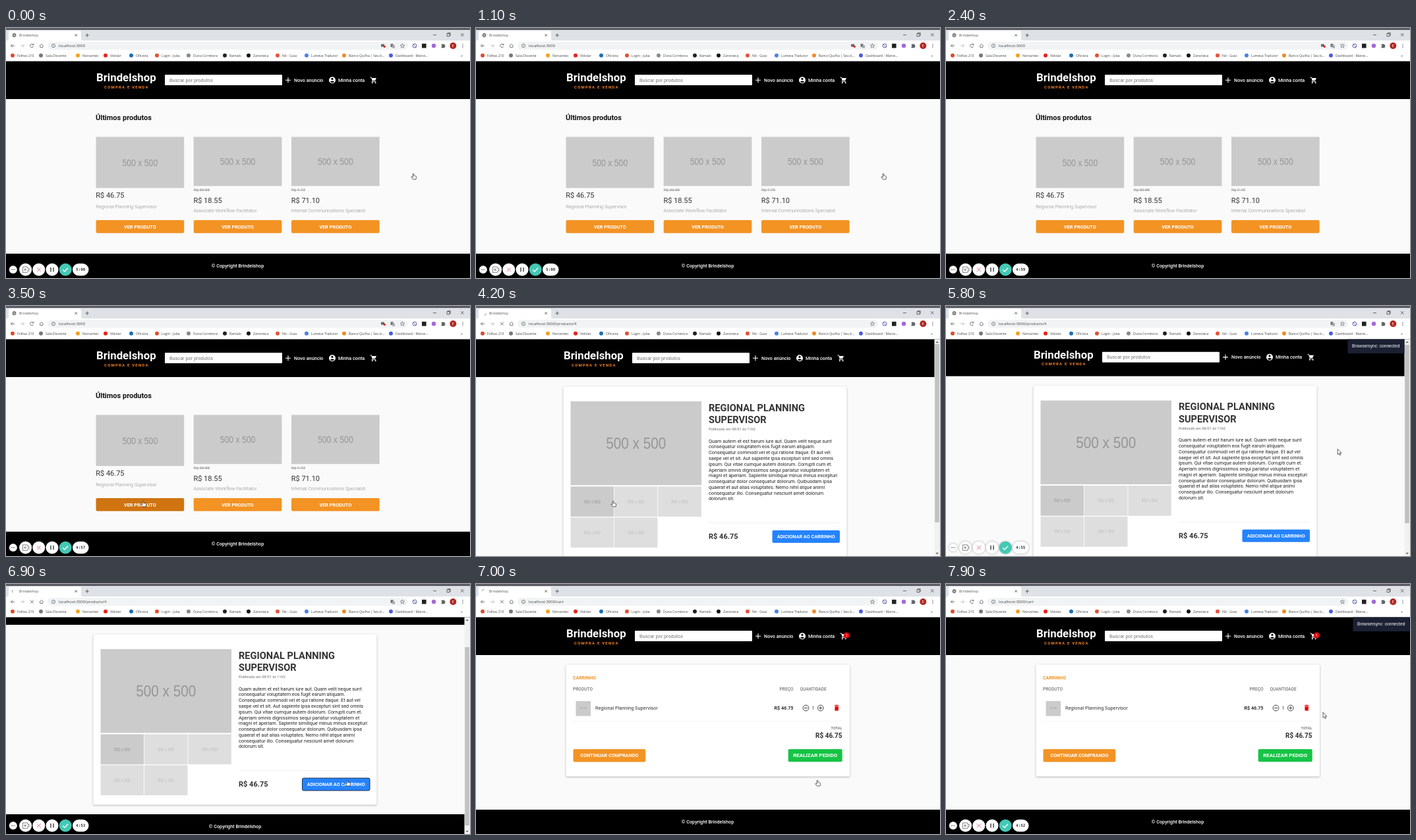
An HTML page that plays this animation: 704x380 px, repeating every 8 s.

```html
<!DOCTYPE html>
<html lang="pt-BR">
<head>
<meta charset="utf-8">
<title>Brindelshop</title>
<style>
html, body { margin: 0; width: 100%; height: 100%; overflow: hidden; background: #fafafa }
svg { display: block; width: 704px; height: 380px; font-family: Roboto, sans-serif }
text { white-space: pre }
.ui { font-family: "Open Sans", sans-serif }
.arial { font-family: "Liberation Sans", sans-serif }
.mono { font-family: "DejaVu Sans Mono", monospace }
.card { filter: drop-shadow(0 1px 1.5px rgba(0,0,0,.28)) }
.tool { filter: drop-shadow(0 .5px 1.5px rgba(0,0,0,.35)) }
</style>
</head>
<body>
<svg id="stage" viewBox="0 0 704 380"></svg>
<script>
const LOOP = 8000;
const SHOP = 'Brindelshop', ITEM = 'Regional Planning Supervisor';
const ORANGE = '#f39324';
const BOOKMARKS = [
  [10, '#e0492c', 'Folhas 210'], [53, '#777', 'Sala Discente'], [109, '#f2a01f', 'Norvantec'],
  [151, '#e8231c', 'Vidolar'], [190, '#1b6fb5', 'Oficiora'], [229, '#e2502c', 'Login - Juba'],
  [277, '#8a8a8a', 'Duna Corretora'], [332, '#222', 'Ramalo'], [368, '#111', 'Zarvoteca'],
  [412, '#e5533a', 'Nó - Guia'], [456, '#4a80e8', 'Lumeva Tradutor'],
  [513, '#f08a24', 'Banco Quilha | Seu b...'], [584, '#4a5be0', 'Dashboard - Marce...']
];
const LOREM = [
  'Quam autem et est harum iure aut. Quam velit neque sunt',
  'consequatur voluptatem eos fugit earum aliquam.',
  'Consequatur commodi vel et qui ratione itaque. Et aut vel',
  'saepe vel et sit. Aut sapiente ipsa excepturi sint sed omnis',
  'ipsum. Qui vitae cumque autem dolorum. Corrupti cum et.',
  'Aperiam omnis dignissimos sequi pariatur voluptatem et',
  'magni et aperiam. Sapiente similique minus minus excepturi',
  'consequatur dolor consequatur dolorum. Quibusdam ipsa',
  'quaerat et aut alias voluptates. Nemo nihil atque animi',
  'consequatur illo. Consequatur nesciunt amet dolorum',
  'dolorum sit.'
];
// Pointer tip: time, x, y
const PATH = [[0, 618, 221], [2800, 618, 221], [3400, 208, 296], [4550, 208, 296], [5250, 602, 209],
  [5650, 602, 209], [6450, 518, 298], [7250, 518, 298], [7750, 572, 195], [LOOP, 572, 195]];

const text = (x, y, s, size, fill, attrs = '') =>
  `<text x="${x}" y="${y}" font-size="${size}" fill="${fill}" ${attrs}>${s}</text>`;
const rect = (x, y, w, h, fill, attrs = '') =>
  `<rect x="${x}" y="${y}" width="${w}" height="${h}" fill="${fill}" ${attrs}/>`;
const circle = (x, y, r, fill, attrs = '') => `<circle cx="${x}" cy="${y}" r="${r}" fill="${fill}" ${attrs}/>`;
const line = (d, color, w = 1, attrs = '') =>
  `<path d="${d}" fill="none" stroke="${color}" stroke-width="${w}" ${attrs}/>`;
const shape = (d, fill, attrs = '') => `<path d="${d}" fill="${fill}" ${attrs}/>`;
const move = (x, y, s) => `<g transform="translate(${x} ${y})">${s}</g>`;
const BOLD = 'font-weight="700"', MEDIUM = 'font-weight="500"', LIGHT = 'font-weight="300"';
const MID = 'text-anchor="middle"', END = 'text-anchor="end"', UI = 'class="ui"';

const between = (t, a, b) => t >= a && t < b;
const ease = (t, a, b) => {
  const k = Math.min(1, Math.max(0, (t - a) / (b - a)));
  return k * k * (3 - 2 * k);
};

function pointer(t) {
  const i = Math.max(1, PATH.findIndex(p => p[0] > t));
  const [a, b] = [PATH[i - 1], PATH[i]], k = ease(t, a[0], b[0]);
  return [a[1] + (b[1] - a[1]) * k, a[2] + (b[2] - a[2]) * k];
}

const globe = (x, y) => circle(x, y, 2.9, '#666') +
  line(`M${x - 2} ${y - 1}l2 1 1-1.6M${x - 1} ${y + 2}l1-1.2 2 .2`, '#fff', .8);

const button = (x, y, w, h, fill, label, size = 7.3, attrs = '') =>
  rect(x, y, w, h, fill, `rx="2" ${attrs}`) +
  text(x + w / 2, y + h / 2 + size * .36, label, size, '#fff', `${BOLD} ${MID}`);

const placeholder = (x, y, w, h, size, opacity = 1) =>
  `<g opacity="${opacity}">` + rect(x, y, w, h, '#cbcbcb') +
  `<g transform="translate(${x + w / 2} ${y + h / 2}) scale(.85 1)">` +
  text(0, size * .36, '500 x 500', size, '#969696', `class="arial" ${MID}`) + '</g></g>';

function browser(t, url, loading, home) {
  const grey = '#5f6368';
  let s = rect(0, 0, 704, 50.5, '#fff') + rect(0, 0, 704, 19, '#dee1e6') + rect(0, 0, 704, 3, '#5c5c64') +
    shape('M2 19q2 0 2-3V7q0-3 3-3H111q3 0 3 3v9q0 3 2 3z', '#fff') +
    text(20, 12.8, SHOP, 5.1, '#555', UI) +
    line('M104.5 9.3l3.4 3.4m0-3.4l-3.4 3.4M120.5 11h5.4m-2.7-2.7v5.4', '#444', .8) +
    line('M648 10.5h5M669 8.6h4v4h-4zM670.2 8.4v-1h4v4h-1M690 8l4.6 4.6m0-4.6l-4.6 4.6', '#333', .7);
  s += loading
    ? line('M12.5 8a3 3 0 0 1 3 3', '#8a8f96', .9, `transform="rotate(${t * .45 % 360} 12.5 11)"`)
    : globe(12.5, 11);
  s += line('M13 27H7.5m2.5-2.5L7.5 27l2.5 2.5', grey, .9) +
    line('M22 27h5.5m-2.5-2.5l2.5 2.5-2.5 2.5', '#b9bbbf', .9) +
    (loading ? line('M37 24.6l4.8 4.8m0-4.8L37 29.4', grey, .9)
      : line('M41.6 28a2.6 2.6 0 1 1-.3-2.6M41.8 23.8v2h-2', grey, .9)) +
    line('M50.8 27l3-2.7 3 2.7M51.8 26.6v3h4v-3', grey, .8) +
    rect(63, 21, 547, 12, '#f1f3f4', 'rx="6"') +
    circle(72, 27, 2.7, 'none', `stroke="${grey}" stroke-width=".7"`) + line('M72 26.5v2M72 25.2v.7', grey, .7) +
    text(80, 29.2, 'localhost:3000' + url, 5.95, '#444', UI);
  if (home) s += rect(569, 24.5, 5, 4, '#666', 'rx=".5"') + circle(574.3, 28.3, 1.7, '#d93025');
  if (home || (between(t, 4600, 7000)))
    s += rect(583.5, 24, 4, 5, '#777', 'rx=".5"') + rect(586, 26, 4, 4.4, '#a5a9ae', 'rx=".5"');
  s += line('M601.5 23.8l.9 2.2 2.3.1-1.8 1.5.6 2.3-2-1.3-2 1.3.6-2.3-1.8-1.5 2.3-.1z', grey, .7) +
    circle(620, 27, 3, 'none', 'stroke="#5862a8" stroke-width="1"') + line('M618 25l4 4', '#5862a8', .8) +
    rect(631, 23.8, 6.6, 6.6, '#222') + circle(649, 27, 3.2, '#a568d8') +
    shape('M660.5 25h1.6a1 1 0 1 1 2 0h1.6v1.6a1 1 0 1 1 0 2v1.7h-5.2v-1.7a1 1 0 1 0 0-2z', grey) +
    circle(678.3, 27, 5, '#b3261e') + text(678.3, 29, 'E', 5.2, '#fff', MID) +
    [24.7, 27, 29.3].map(y => circle(693, y, .7, grey)).join('');
  for (const [x, color, label] of BOOKMARKS)
    s += circle(x, 41.7, 3, color) + text(x + 7, 43.7, label, 5.1, '#444', UI);
  return s + text(690, 43.7, '»', 6, '#444', UI);
}

function header(badge) {
  return rect(-10, 50, 724, 58, '#000') +
    text(182.3, 81.2, SHOP, 16.8, '#fff', `${BOLD} ${MID}`) +
    text(149, 91.8, 'COMPRA E VENDA', 6, '#f5832a', `${BOLD} letter-spacing="1.2"`) +
    rect(241, 71, 178, 16, '#fff', 'rx="1"') +
    text(248, 81.7, 'Buscar por produtos', 7.3, '#757575') +
    line('M424 79.2h8m-4-4v8', '#fff', 1.1) +
    text(437, 81.8, 'Novo anúncio', 7.25, '#fff', MEDIUM) +
    circle(495, 79.2, 5, '#fff') + circle(495, 77.3, 1.6, '#000') + shape('M491.8 81.6q3.2-2.4 6.4 0-3.2 3.4-6.4 0z', '#000') +
    text(504, 81.8, 'Minha conta', 7.25, '#fff', MEDIUM) +
    line('M552.5 75h1.8l2 4.6h4', '#fff', 1) + shape('M555 76h7l-2 4h-4z', '#fff') +
    line('M556.2 79.6l-1 1.9h6', '#fff', .9) + circle(555.8, 83.2, 1, '#fff') + circle(560.6, 83.2, 1, '#fff') +
    (badge ? circle(562.3, 78, 4.6, '#e30613') + text(562.3, 80, '1', 5.5, '#fff', MID) : '');
}

const footer = y => rect(-10, y, 724, 60, '#000') +
  text(351.5, y + 21.3, `© Copyright ${SHOP}`, 7.25, '#fff', `${MEDIUM} ${MID}`);

function homePage(hover) {
  const cards = [
    [136.5, 'R$ 46.75', ITEM],
    [284.7, 'R$ 18.55', 'Associate Workflow Facilitator', 'R$ 30.88'],
    [433, 'R$ 71.10', 'Internal Communications Specialist', 'R$ 7.73']
  ];
  let s = header() + text(136, 140.3, 'Últimos produtos', 11, '#111', BOLD);
  cards.forEach(([x, price, name, old], i) => {
    s += placeholder(x, 165.5, 133.7, old ? 74.7 : 77.7, 14.4) +
      (old ? text(x, 248.4, old, 6.2, '#888', 'text-decoration="line-through"') : '') +
      text(x - .3, old ? 265.8 : 257.8, price, 11, '#333') +
      text(x - .3, old ? 279.6 : 274, name, 7.25, '#888', LIGHT) +
      button(x, 292, 133.7, 19.8, i === hover ? '#cf7410' : ORANGE, 'VER PRODUTO');
  });
  return s + footer(343);
}

function productPage(scroll, focus) {
  let s = header() + rect(136.5, 122.5, 430, 259, '#fff', 'class="card" rx="1"') +
    placeholder(147.5, 145, 198.5, 127.3, 24.4);
  for (let i = 0; i < 5; i++)
    s += placeholder(147.5 + i % 3 * 66.4, 274.4 + (i > 2) * 47, 65.6, 45.8, 6.7, i ? .62 : 1);
  s += text(357, 159.6, 'REGIONAL PLANNING', 14.6, '#333', BOLD) +
    text(357, 178.4, 'SUPERVISOR', 14.6, '#333', BOLD) +
    text(357, 189, 'Publicado em 08/01 às 11h2', 5.5, '#999', BOLD) +
    LOREM.map((l, i) => text(357, 207.6 + i * 8.78, l, 7.3, '#222')).join('') +
    rect(357, 329.3, 199, .6, '#e8e8e8') +
    text(357, 354, 'R$ 46.75', 11, '#333', BOLD) +
    button(453.5, 341, 102.5, 19, '#2583fb', 'ADICIONAR AO CARRINHO', 7.25,
      focus ? 'stroke="#16233d" stroke-width=".9"' : '') + footer(396);
  return move(-4, -scroll, s) +
    rect(695.5, 50.5, 8.5, 330, '#f1f1f1') + rect(696.3, 58 + scroll * .826, 6.6, 271, '#c1c1c1') +
    shape('M697.5 56l2.2-2.5 2.2 2.5zM697.5 375l2.2 2.5 2.2-2.5z', '#666');
}

function cartPage() {
  const grey = '#777', dark = '#333';
  const ring = (x, d) => circle(x, 188.5, 4.4, 'none', `stroke="${dark}" stroke-width=".9"`) + line(d, dark, .9);
  return header(true) + rect(136.5, 122.5, 430.5, 170, '#fff', 'class="card" rx="1"') +
    text(147, 145, 'CARRINHO', 7, ORANGE, BOLD) +
    text(147, 161.6, 'PRODUTO', 6.6, grey, MEDIUM) +
    text(481.5, 161.6, 'PREÇO', 6.6, grey, `${MEDIUM} ${END}`) +
    text(491.5, 161.6, 'QUANTIDADE', 6.6, grey, MEDIUM) +
    placeholder(151.5, 178, 22.5, 22.7, 2.6) +
    text(181, 191, ITEM, 7.3, dark) +
    text(481.5, 191, 'R$ 46.75', 7.2, dark, `${BOLD} ${END}`) +
    ring(500.5, 'M498 188.5h5') + text(511.5, 191.4, '1', 7.3, dark, MID) +
    ring(522.8, 'M520.3 188.5h5M522.8 186v5') +
    rect(543.8, 184.4, 6.8, 1.1, '#e60000') + rect(545.7, 183.6, 3, 1, '#e60000') +
    rect(544.5, 186.2, 5.4, 6.4, '#e60000', 'rx=".6"') +
    rect(147, 208, 409, .6, '#eee') +
    text(555.5, 220.8, 'TOTAL', 5.6, grey, `${BOLD} ${END}`) +
    text(555.5, 233.7, 'R$ 46.75', 10, dark, `${BOLD} ${END}`) +
    button(147.5, 251, 109.7, 19.5, ORANGE, 'CONTINUAR COMPRANDO') +
    button(473.7, 251, 82, 19.2, '#16c445', 'REALIZAR PEDIDO', 8) + footer(343);
}

const toast = (right, opacity) => `<g opacity="${opacity}">` + rect(right - 86, 50.5, 86, 21.5, '#1b2032') +
  text(right - 79.5, 63.4, 'Browsersync: connected', 6.65, '#fff', 'class="arial"') + '</g>';

function recorder(t) {
  const left = 300 - Math.max(0, Math.floor(t * .00115 - .85));
  const clock = `${Math.floor(left / 60)}:${String(left % 60).padStart(2, '0')}`;
  return '<g class="tool">' + circle(10.8, 367.3, 6, '#fff') +
    [29.6, 49.8, 70].map(x => circle(x, 367.3, 9.5, '#fff')).join('') +
    circle(90.2, 367.3, 9.5, '#43c9b5') + rect(101, 358, 24.5, 18.5, '#fff', 'rx="9.2"') + '</g>' +
    [8.6, 10.8, 13].map(x => circle(x, 367.3, .7, '#555')).join('') +
    line('M32.6 365v-2h-7.2v8.6h7.2v-2M32.6 366l2.2-1v4.6l-2.2-1M29 365.2v4.2m-2-2.1h4', '#777', .9) +
    line('M46.8 364.3l6 6m0-6l-6 6', '#e0788c', 1) +
    line('M68 364v6.6M72 364v6.6', '#777', 2) +
    line('M86.2 367.5l2.7 2.8 5.2-5.6', '#fff', 1.4) +
    text(113.2, 369.4, clock, 5.9, '#333', `class="mono" ${BOLD} ${MID}`);
}

const hand = (x, y) => move(x, y, shape(
  'M-.8 .8q.8-1.3 1.6 0V3.4l3 .8q1 .4.8 1.6L4 9H-.6L-3.2 5.8q.3-1.2 1.4-.5l1 .7z',
  '#fff', 'stroke="#222" stroke-width=".7"'));
const arrow = (x, y) => move(x, y, shape(
  'M0 0v8.3l1.9-1.7 1.3 3 1.4-.6-1.3-2.9h2.6z', '#fff', 'stroke="#222" stroke-width=".7"'));

function draw(t) {
  const home = t < 3900, cart = t >= 7000;
  const loading = between(t, 3700, 4600) || between(t, 6700, 7200);
  const [x, y] = pointer(t);
  const hover = home && between(y, 292, 312) ? [136.5, 284.7, 433].findIndex(b => between(x, b, b + 133.7)) : -1;
  let s = rect(0, 0, 704, 380, '#fafafa');
  s += home ? homePage(hover) : cart ? cartPage() : productPage(46 * ease(t, 5750, 6250), t >= 6650);
  s += browser(t, home ? '' : cart ? '/cart' : '/products/4', loading, home);
  if (between(t, 4800, 6300)) s += toast(695.5, 1 - ease(t, 6100, 6300));
  if (t >= 7350) s += toast(703.5, 1);
  if (!between(t, 3900, 4700) && !between(t, 7000, 7150)) s += recorder(t);
  const link = t < 1300 || hover >= 0 || between(t, 3400, 4600) || between(t, 6350, 7300);
  if (!between(t, 1300, 2750)) s += (link ? hand : arrow)(x, y);
  stage.innerHTML = s;
}

const stage = document.getElementById('stage');
const start = performance.now();
function tick() {
  draw((performance.now() - start) % LOOP);
  requestAnimationFrame(tick);
}
tick();
</script>
</body>
</html>
```
